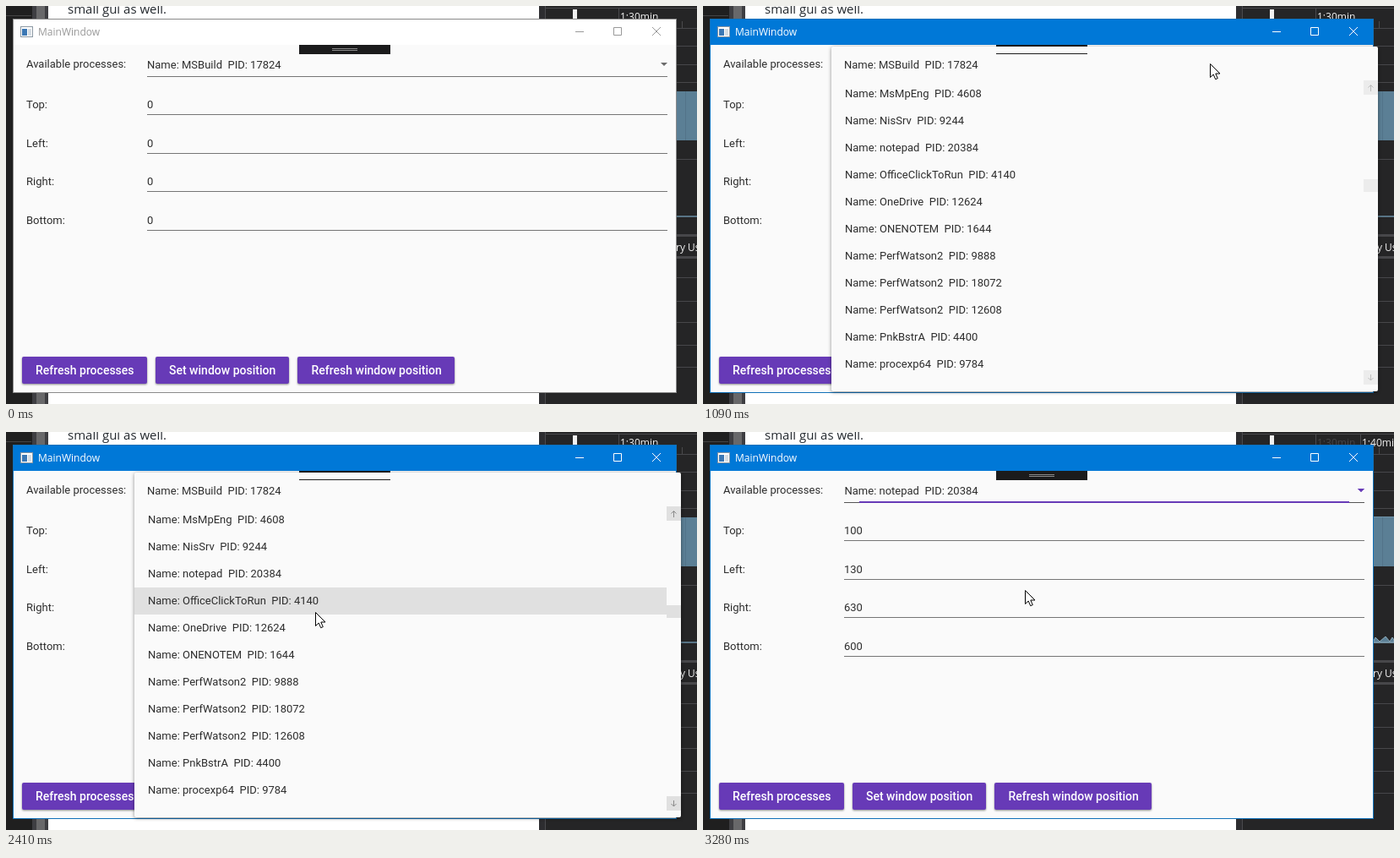
These frames come from a looping animation (818 px wide and 471 px high, 3.35 s). An HTML page:

```html
<!DOCTYPE html>
<html lang="en">
<head>
<meta charset="utf-8">
<title>MainWindow</title>
<style>
html, body { margin: 0; width: 100%; height: 100%; overflow: hidden; background: #1f1f1f; }
svg { display: block; width: 818px; height: 471px; }
text { white-space: pre; font: 13px Roboto, sans-serif; fill: #2d2d2d; }
.ui { font: 12px "Open Sans", "Noto Sans", sans-serif; fill: #f1f1f1; }
.doc { font: 15px "Open Sans", "Noto Sans", sans-serif; fill: #24292e; }
.btn text { font-weight: 500; font-size: 14px; fill: #fff; }
.btn rect { fill: #673ab7; filter: drop-shadow(0 1px 1px rgba(0,0,0,.45)); }

/* every part shares one clock and holds its pose between keys */
.a, .old, .new { animation: 3350ms step-end infinite; }
.old { animation-name: old; }
.new { animation-name: new; }
@keyframes old { 0% { visibility: visible } 92.53%, 100% { visibility: hidden } }
@keyframes new { 0% { visibility: hidden } 92.53%, 100% { visibility: visible } }

#bar { animation-name: bar; }
@keyframes bar { 0% { fill: #fff } 20.89%, 100% { fill: #0078d7 } }
#frame { animation-name: frame; }
@keyframes frame { 0% { stroke: #8a8a8a } 20.89%, 100% { stroke: #1070b8 } }
#chrome { animation-name: chrome; }
@keyframes chrome { 0% { color: #999 } 20.89%, 100% { color: #fff } }
#chrome text { fill: currentColor; }

/* underlines lit briefly while the pointer crosses a field */
.blip { opacity: 0; fill: #673ab7; animation: blip 3350ms step-end infinite; }
@keyframes blip { 0% { opacity: .8 } 1.79%, 100% { opacity: 0 } }
#arrow { animation-name: arrow; }
@keyframes arrow { 0% { fill: #6b6b6b } 9.85%, 100% { fill: #673ab7 } }
#comboLine { animation-name: comboLine; }
@keyframes comboLine { 0% { fill: #757575 } 9.85%, 100% { fill: #444 } }
#focus { transform-origin: 475px 83px; animation-name: focus; }
@keyframes focus {
  0% { transform: scaleX(0) }
  92.53% { transform: scaleX(.331) }
  94.02% { transform: scaleX(.6) }
  96.11% { transform: scaleX(.84) }
  97.91%, 100% { transform: scaleX(.943) }
}

#popup { animation-name: popup; }
@keyframes popup {
  0% { opacity: 0 }
  26.86% { opacity: .35 }
  28.65% { opacity: .7 }
  30.44% { opacity: .9 }
  32.53% { opacity: 1 }
  92.53% { opacity: .89 }
  94.02% { opacity: .5 }
  96.11% { opacity: .15 }
  97.91%, 100% { opacity: 0 }
}
#sheet { filter: drop-shadow(0 1px 2px rgba(0,0,0,.45)); }
#scroll { animation-name: scroll; }
@keyframes scroll { 0% { opacity: .55 } 47.16%, 100% { opacity: 1 } }

.row { fill: #e0e0e0; opacity: 0; }
#row0 { animation-name: row0; }
#row1 { animation-name: row1; }
#row2 { animation-name: row2; }
#row3 { animation-name: row3; }
@keyframes row0 { 47.16% { opacity: .6 } 48.95% { opacity: 1 } 54.92% { opacity: .65 } 56.41% { opacity: 0 } }
@keyframes row1 { 50.89% { opacity: 1 } 56.41% { opacity: .5 } 58.5% { opacity: 0 } }
@keyframes row2 { 54.92% { opacity: 1 } 58.5% { opacity: 0 } 83.28% { opacity: 1 } 92.53% { opacity: 0 } }
@keyframes row3 { 58.5% { opacity: .5 } 60.59% { opacity: 1 } 83.28% { opacity: .5 } 85.37% { opacity: 0 } }

#press { animation-name: press; }
@keyframes press {
  0% { opacity: 0 }
  20.89% { opacity: 1 }
  26.86% { opacity: 0 }
  85.37% { opacity: 1 }
  88.95%, 100% { opacity: 0 }
}
#pointer { animation-name: pointer; }
@keyframes pointer {
  0% { transform: translate(570px, -40px) }
  1.49% { transform: translate(570px, 316px) }
  2.98% { transform: translate(574px, 256px) }
  4.77% { transform: translate(582px, 208px) }
  6.56% { transform: translate(589px, 163px) }
  8.05% { transform: translate(594px, 119px) }
  9.85% { transform: translate(598px, 84px) }
  11.34% { transform: translate(600px, 68px) }
  43.28% { transform: translate(594px, 72px) }
  45.22% { transform: translate(570px, 84px) }
  47.16% { transform: translate(535px, 99px) }
  48.95% { transform: translate(500px, 113px) }
  50.89% { transform: translate(462px, 128px) }
  52.83% { transform: translate(425px, 146px) }
  54.92% { transform: translate(395px, 165px) }
  56.41% { transform: translate(385px, 178px) }
  58.5% { transform: translate(376px, 190px) }
  60.59% { transform: translate(372px, 197px) }
  62.38% { transform: translate(369px, 201px) }
  64.17% { transform: translate(367px, 205px) }
  66.26% { transform: translate(366px, 208px) }
  68.35% { transform: translate(366px, 211px) }
  71.94% { transform: translate(366px, 213px) }
  75.82% { transform: translate(366px, 212px) }
  77.91% { transform: translate(365px, 208px) }
  79.7% { transform: translate(362px, 198px) }
  81.49% { transform: translate(358px, 187px) }
  83.28% { transform: translate(355px, 177px) }
  85.37% { transform: translate(353px, 171px) }
  94.02% { transform: translate(360px, 175px) }
  96.11% { transform: translate(373px, 183px) }
  97.91%, 100% { transform: translate(381px, 187px) }
}
</style>
</head>
<body>
<svg viewBox="0 0 818 471" xmlns="http://www.w3.org/2000/svg">
  <!-- desktop behind the window -->
  <rect width="818" height="471" fill="#1f1f1f"/>
  <path d="M0 11.5h30" stroke="#444"/>
  <rect x="31" width="19" height="471" fill="#3e3e42"/>
  <rect x="36" width="10" height="471" fill="#68686a"/>
  <rect x="50" width="581" height="471" fill="#fff"/>
  <text class="doc" x="73" y="9">small gui as well.</text>
  <rect x="631" width="7" height="471" fill="#2d2d30"/>
  <rect x="638" width="180" height="471" fill="#252526"/>
  <path d="M638.5 0v471M638 2.5h180M725.5 3v12M800.5 18v8" stroke="#4a4a4d"/>
  <rect x="671" y="4" width="5" height="12" fill="#f1f1f1"/>
  <g id="panel" fill="#47474a"></g>
  <rect x="793" y="101" width="25" height="58" fill="#5b7f95"/>
  <path d="M804.5 101v58" stroke="#527389"/>
  <rect x="793" y="248" width="25" height="2" fill="#587485"/>
  <text class="ui" x="793" y="290">ry Us</text>
  <text class="ui old" x="727" y="17">1:30min</text>
  <g class="new">
    <text class="ui" x="727" y="17" style="fill:#454548">1:30min</text>
    <text class="ui" x="780" y="17">1:40min</text>
    <path d="M778.5 3v12" stroke="#4a4a4d"/>
    <path d="M793 100.5h25" stroke="#6f93a8"/>
    <path d="M793 249l3-6 5 5 7-6 5 6 3-5 2 3v3z" fill="#5b7f95" stroke="#8eabba"/>
  </g>

  <!-- main window -->
  <rect x="9" y="16" width="784" height="441" fill="#fafafa"/>
  <rect id="bar" class="a" x="9" y="15" width="784" height="31" fill="#fff"/>
  <rect id="frame" class="a" x="8.5" y="15.5" width="785" height="442" fill="none" stroke="#8a8a8a"/>
  <rect x="17.5" y="24.5" width="14" height="12" fill="#fff" stroke="#8b98a3"/>
  <rect x="19" y="27" width="6" height="8" fill="#3c78b4"/>
  <rect x="26" y="27" width="4" height="8" fill="#d5dce2"/>
  <g id="chrome" class="a" color="#999">
    <text class="ui" x="38" y="35">MainWindow</text>
    <path d="M674 30.5h10M719.5 25.5h9v9h-9zM765 25l10 10M775 25l-10 10" fill="none" stroke="currentColor"/>
  </g>
  <rect x="347" y="46" width="108" height="11" fill="#1b1b1c"/>
  <path d="M386 50.5h30M386 52.5h30" stroke="#8a8a8a"/>

  <text x="24" y="73">Available processes:</text>
  <text class="old" x="167" y="74">Name: MSBuild  PID: 17824</text>
  <rect id="comboLine" class="a" x="167" y="83" width="616" height="1" fill="#757575"/>
  <path id="arrow" class="a" d="M775 67h8l-4 4z" fill="#6b6b6b"/>
  <g id="fields"></g>
  <g id="buttons" class="btn"></g>

  <!-- drop-down list -->
  <g id="popup" class="a" opacity="0">
    <rect id="sheet" x="152" y="48" width="647" height="408" rx="2" fill="#fafafa"/>
    <rect x="347" y="46" width="108" height="2" fill="#1b1b1c"/>
    <rect x="347" y="56" width="108" height="1" fill="#1b1b1c"/>
    <text class="old" x="167" y="74">Name: MSBuild  PID: 17824</text>
    <g id="rows"></g>
    <rect class="new" x="152" y="88" width="630" height="32" fill="#cdcdcd"/>
    <g id="scroll" class="a">
      <path d="M782 88h17v17h-17zM782 205h17v15h-17zM782 431h17v17h-17z" fill="#e0e0e0"/>
      <path d="M790.5 101v-7M787.5 96.500l3-3 3 3M790.5 436v7M787.5 440l3 3 3-3" fill="none" stroke="#8a8a8a"/>
    </g>
    <g id="items"></g>
  </g>
  <g class="new">
    <text x="167.500" y="74">Name: notepad  PID: 20384</text>
    <rect x="167" y="83" width="616" height="1" fill="#555"/>
    <path d="M775 67h8l-4 4z" fill="#673ab7"/>
  </g>
  <rect id="focus" class="a" x="167" y="82" width="616" height="2" fill="#673ab7"/>

  <g id="pointer" class="a">
    <circle id="press" class="a" r="12" fill="#faf27d"/>
    <path d="M.5.5v16l3.700-3.500 2.500 5.700 2.600-1.100-2.500-5.600h5.200z" fill="#fff" stroke="#000"/>
  </g>
</svg>
<script>
const NS = "http://www.w3.org/2000/svg";
function add(id, tag, attrs, label) {
  const el = document.createElementNS(NS, tag);
  for (const key in attrs) el.setAttribute(key, attrs[key]);
  if (label !== undefined) el.textContent = label;
  document.getElementById(id).append(el);
  return el;
}

for (const y of [26, 47, 69, 90, 181, 321, 349, 374, 401, 427])
  add("panel", "rect", { x: 793, y, width: 25, height: 1 });
for (const y of [270, 296]) add("panel", "rect", { x: 793, y, width: 25, height: 3 });

const underline = y => ({ x: 167, y, width: 616, height: 1 });
function blip(y, delay) {
  add("fields", "rect", { ...underline(y), class: "blip" }).style.animationDelay = delay + "ms";
}
[["Top:", 100, 121, 270], ["Left:", 130, 167, 220], ["Right:", 630, 212, 160], ["Bottom:", 600, 258, 100]]
  .forEach(([label, value, y, hover]) => {
    add("fields", "text", { x: 24, y }, label);
    add("fields", "text", { x: 167, y, class: "old" }, 0);
    add("fields", "text", { x: 167, y, class: "new" }, value);
    add("fields", "rect", { ...underline(y + 7), fill: "#757575" });
    blip(y + 7, hover);
  });
blip(174, 3100);

[["Refresh processes", 19, 148, 35], ["Set window position", 177, 158, 193], ["Refresh window position", 345, 186, 361.5]]
  .forEach(([label, x, width, textX]) => {
    add("buttons", "rect", { x, y: 415, width, height: 32, rx: 2 });
    add("buttons", "text", { x: textX, y: 436 }, label);
  });

for (let i = 0; i < 4; i++)
  add("rows", "rect", { id: "row" + i, class: "a row", x: 152, y: 88 + 32 * i, width: 630, height: 32 });

function list(processes, first, cls) {
  processes.forEach(([name, pid], i) =>
    add("items", "text", { x: 168, y: 108 + 32 * (first + i), class: cls }, `Name: ${name}  PID: ${pid}`));
}
const head = [["MSBuild", 17824], ["MsMpEng", 4608], ["NisSrv", 9244], ["notepad", 20384]];
list(head.slice(1), 0, "old");
list(head.slice(0, 3), 0, "new");
list([["OfficeClickToRun", 4140], ["OneDrive", 12624], ["ONENOTEM", 1644], ["PerfWatson2", 9888],
  ["PerfWatson2", 18072], ["PerfWatson2", 12608], ["PnkBstrA", 4400], ["procexp64", 9784]], 3, "");
</script>
</body>
</html>
```
